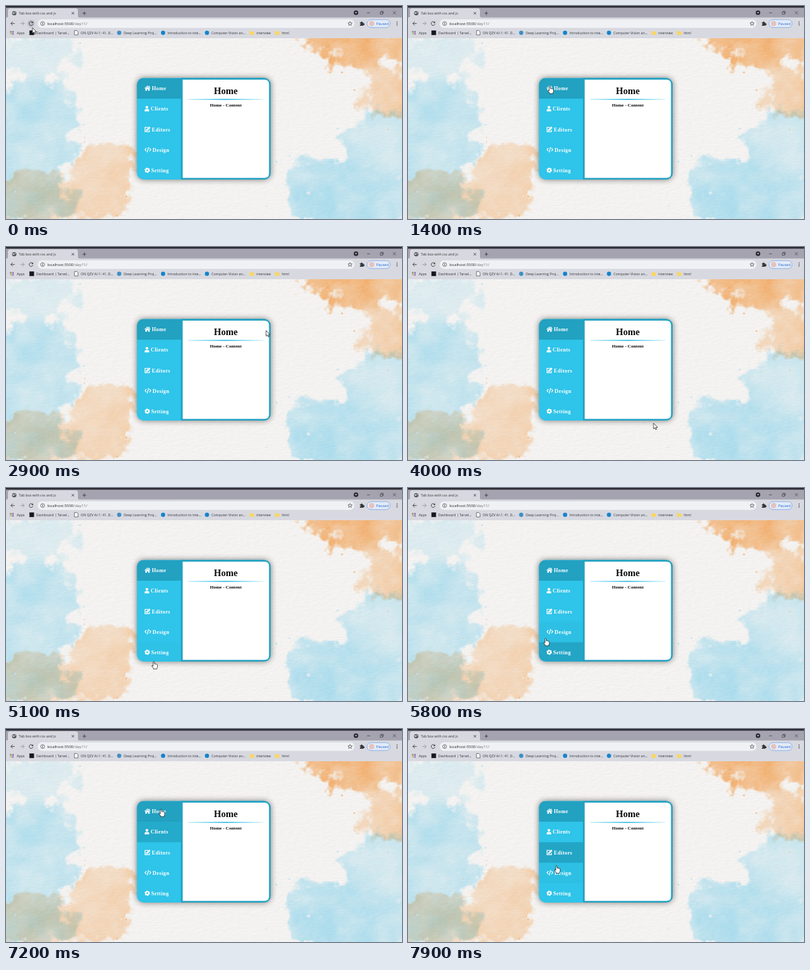
Recreate the animation shown at these times as an HTML page with a canvas. Size 600 px wide and 324 px high, loop 8 s.

```html
<!DOCTYPE html>
<html lang="en">
<head>
<meta charset="utf-8">
<title>Tab box with css and js</title>
<style>
  html, body { margin: 0; width: 100%; height: 100%; overflow: hidden; background: #f2f1ef; }
  canvas, svg { position: absolute; left: 0; top: 0; width: 100%; height: 100%; display: block; }
  .ui { font-family: "Open Sans", "Noto Sans", sans-serif; fill: #33363a; }
  .serif { font-family: "Liberation Serif", "Noto Serif", serif; font-weight: bold; }
  .line { fill: none; stroke: #3c3f43; stroke-width: .9; }
  .thin { stroke-width: .7; }
  .icon { fill: none; stroke: #fff; stroke-width: 1.2; }
</style>
</head>
<body>
<canvas id="paper" width="600" height="324"></canvas>
<svg viewBox="0 0 600 324" preserveAspectRatio="none">
  <defs>
    <filter id="shadow" x="-20%" y="-20%" width="140%" height="140%">
      <feGaussianBlur stdDeviation="4.5"/>
    </filter>
    <clipPath id="cardClip"><rect x="198.5" y="109.5" width="202.5" height="154.5" rx="10"/></clipPath>
    <linearGradient id="rule">
      <stop offset="0" stop-color="#2cc1e8" stop-opacity=".25"/>
      <stop offset=".5" stop-color="#2cb9e0"/>
      <stop offset="1" stop-color="#2cc1e8" stop-opacity=".15"/>
    </linearGradient>
  </defs>

  <!-- browser frame -->
  <g class="ui">
    <rect width="600" height="18" fill="#a5a3b0"/>
    <rect width="600" height="2.5" fill="#2b2b34"/>
    <path d="M0 18Q3 18 3 15V7Q3 3.500 6.500 3.500H105.500Q109 3.500 109 7V15Q109 18 112 18Z" fill="#d8d9e0"/>
    <rect y="17.500" width="600" height="31.500" fill="#d8d9e0"/>
    <circle cx="12.500" cy="11" r="3.300" fill="#55595e"/>
    <path d="M10.300 9.500l2.200 .6 .3 1.500-1.500 .5-1.300-1zM13.200 8.400l1.500 1-.3 1.500-1-.9z" fill="#d8d9e0"/>
    <text x="19.500" y="13" font-size="5.300">Tab box with css and js</text>
    <path class="line" d="M99.600 9.200l3.600 3.600m0-3.600l-3.600 3.600M116 11h5.400M118.700 8.300v5.400"/>
    <circle cx="530.300" cy="10.200" r="3.400" fill="#26262d"/>
    <path d="M528.500 9.300h3.600l-1.800 2.200z" fill="#c9c8d2"/>
    <path class="line thin" d="M547 10.400h4.600M567 9.200h3.400v3.400H567zM568.200 9.200V8h3.400v3.400h-1.200M586.300 8.100l4.400 4.400m0-4.400l-4.400 4.400"/>

    <rect x="48" y="20.200" width="480" height="13" rx="6.500" fill="#f0f1f4"/>
    <path class="line" d="M13.200 26.600H7.400M10.200 23.700l-2.900 2.900 2.900 2.900"/>
    <path class="line" style="stroke:#95989e" d="M21.800 26.600h5.800M24.800 23.700l2.900 2.900-2.900 2.900"/>
    <circle id="reloadHover" cx="38" cy="26.700" r="5.700" fill="#bfc1c8"/>
    <path class="line" d="M40.300 24.800A2.900 2.900 0 1 0 40.900 27.300"/>
    <path d="M41.200 23.200v2.900h-2.900z" fill="#3c3f43"/>
    <circle class="line thin" cx="55.500" cy="26.700" r="2.900"/>
    <path class="line" d="M55.500 26.300v2M55.500 24.700v.8"/>
    <text x="62.500" y="28.900" font-size="5.900" fill="#26282b">localhost:5500<tspan fill="#686c71">/day11/</tspan></text>
    <path class="line thin" d="M521.300 23.500l.9 2.100 2.300 .2-1.700 1.500 .5 2.200-2-1.200-2 1.200 .5-2.200-1.700-1.500 2.300-.2z"/>
    <path d="M536 25h1.700a1.200 1.200 0 1 1 2.300 0h1.600v1.700a1.200 1.200 0 1 1 0 2.200v1H536v-1.500a1.100 1.100 0 1 0 0-2.100z"/>
    <rect x="547" y="20.800" width="35" height="12" rx="6" fill="#e3ebf8" stroke="#7ba6e4" stroke-width=".8"/>
    <circle cx="554" cy="26.800" r="4" fill="#e4c3bd"/>
    <text x="561" y="28.900" font-size="5.500" fill="#1d66cc">Paused</text>
    <path class="line" style="stroke-width:1.500;stroke-linecap:round" stroke-dasharray="0 2.400" d="M592.500 24.300v5"/>
    <g id="marks" font-size="5.200"></g>
  </g>

  <!-- card -->
  <rect x="198" y="109" width="203.500" height="155.500" rx="11" fill="#222" opacity=".55" filter="url(#shadow)"/>
  <g clip-path="url(#cardClip)">
    <rect x="198" y="109" width="204" height="156" fill="#2fc4e9"/>
    <g id="rows" fill="#22a1c1"></g>
    <rect x="265" y="109" width="137" height="156" fill="#22a1c1"/>
  </g>
  <path d="M267.700 112H391.500Q398.500 112 398.500 119V254.500Q398.500 261.500 391.500 261.500H267.700Z" fill="#fff"/>
  <g class="serif" text-anchor="middle" fill="#0b0b0b">
    <text x="333" y="134" font-size="14.100">Home</text>
    <text x="333" y="153.200" font-size="7.050">Home - Content</text>
  </g>
  <rect x="276" y="141.300" width="114" height="1.600" fill="url(#rule)"/>
  <g id="menu" class="serif" fill="#fff" font-size="8" letter-spacing=".4"></g>
</svg>

<svg viewBox="0 0 600 324" preserveAspectRatio="none">
  <g id="cursor" stroke="#111" stroke-width=".7" fill="#fff" stroke-linejoin="round">
    <path id="arrow" d="M0 0V8.600L2 6.800L3.300 9.900L4.700 9.300L3.400 6.300H6.200Z"/>
    <path id="hand" d="M-1 1Q-1 0 0 0T1 1V3.800Q2 3 2.700 4Q3.700 3.400 4.200 4.400Q5.500 4.100 5.500 5.300V7.500Q5.500 9 4.600 10.300V11.300H-.6V10.300L-3 7Q-3.400 5.800-2.200 5.900L-1 7Z"/>
  </g>
</svg>

<script>
const NS = 'http://www.w3.org/2000/svg';
const $ = id => document.getElementById(id);
const clamp = (v, lo = 0, hi = 1) => Math.min(hi, Math.max(lo, v));

function add(parent, tag, attrs, text) {
  const el = document.createElementNS(NS, tag);
  for (const k in attrs) el.setAttribute(k, attrs[k]);
  if (text) el.textContent = text;
  return parent.appendChild(el);
}

// ---- paper with watercolour washes ----
function hash(x, y) {
  let n = Math.imul(x, 374761393) + Math.imul(y, 668265263);
  n = Math.imul(n ^ (n >>> 13), 1274126177);
  return ((n ^ (n >>> 16)) >>> 0) / 4294967296;
}

function noise(x, y) {
  const i = Math.floor(x), j = Math.floor(y);
  const ease = f => f * f * (3 - 2 * f);
  const u = ease(x - i), v = ease(y - j);
  const a = hash(i, j), b = hash(i + 1, j), c = hash(i, j + 1), d = hash(i + 1, j + 1);
  return (a + (b - a) * u) * (1 - v) + (c + (d - c) * u) * v;
}

function fbm(x, y) {
  let sum = 0;
  for (let o = 0, amp = .53; o < 4; o++, amp /= 2, x *= 2.1, y *= 2.1) sum += amp * noise(x + o * 17, y);
  return sum;
}

const wash = (cx, cy, rx, ry, strength) => ({ cx, cy, rx, ry, strength });
const pigments = [
  { ink: [.42, .82, .97], drop: '#c3e3f2', seed: 3, washes: [
    wash(30, 75, 85, 40, .17), wash(35, 190, 78, 95, .36), wash(20, 290, 95, 50, .34),
    wash(570, 215, 65, 60, .26), wash(525, 285, 108, 62, .38)] },
  { ink: [.99, .64, .3], drop: '#f3bf8c', seed: 91, washes: [
    wash(550, 58, 85, 42, .64), wash(580, 125, 48, 48, .4),
    wash(150, 265, 50, 58, .3), wash(45, 290, 105, 48, .3)] }
];

function coverage(p, x, y) {
  let best = -99, strength = 0, weight = 0;
  for (const w of p.washes) {
    const d = (1 - Math.hypot((x - w.cx) / w.rx, (y - w.cy) / w.ry)) * Math.min(w.rx, w.ry);
    best = Math.max(best, d);
    const k = Math.exp(clamp(d, -60, 60) / 8);
    strength += w.strength * k;
    weight += k;
  }
  if (best < -35) return 0;
  const v = best + 62 * (fbm(x / 22 + p.seed, y / 22) - .5);
  const tone = .45 + 1.1 * fbm(x / 32 + p.seed * 2, y / 32 + 9);
  return clamp(v / 9) * tone * strength / weight;
}

function paintPaper() {
  const ctx = $('paper').getContext('2d');
  const img = ctx.createImageData(600, 324);
  for (let y = 48; y < 324; y++) for (let x = 0; x < 600; x++) {
    const grain = 6 * (noise(x / 5, y / 2) - noise(x / 5 + .3, y / 2 + .6));
    const rgb = [243 + grain, 242 + grain, 240 + grain];
    for (const p of pigments) {
      const a = coverage(p, x, y);
      if (a) p.ink.forEach((k, c) => rgb[c] *= 1 - a * (1 - k));
    }
    img.data.set([...rgb, 255], (y * 600 + x) * 4);
  }
  ctx.putImageData(img, 0, 0);
  for (const p of pigments) p.washes.forEach((w, k) => splatter(ctx, w, p.drop, p.seed + k * 5));
}

// small drops thrown just outside a wash
function splatter(ctx, w, colour, seed) {
  ctx.fillStyle = colour;
  for (let i = 0; i < 10; i++) {
    const angle = 6.28 * hash(i, seed), reach = 1 + .35 * hash(i, seed + 1);
    const x = w.cx + w.rx * reach * Math.cos(angle), y = w.cy + w.ry * reach * Math.sin(angle);
    if (y < 52) continue;
    ctx.beginPath();
    ctx.arc(x, y, .3 + 1.3 * hash(i, seed + 2) ** 3, 0, 7);
    ctx.fill();
  }
}

// ---- bookmarks ----
const dot = colour => (g, x) => add(g, 'circle', { cx: x + 3.5, cy: 40.7, r: 3.2, fill: colour });
const square = (g, x) => add(g, 'rect', { x, y: 37.2, width: 7, height: 7, fill: '#15191d' });
const sheet = (g, x) => add(g, 'path', { d: `M${x + .8} 37.300h3.600l1.700 1.700v5h-5.300z`, fill: '#fff', class: 'line thin', style: 'fill:#fff' });
const folder = (g, x) => add(g, 'path', { d: `M${x} 38h2.600l.8 .9h3.600v5h-7z`, fill: '#f7d667' });
function grid(g, x) {
  for (let i = 0; i < 9; i++)
    add(g, 'rect', { x: x + i % 3 * 2, y: 38 + Math.floor(i / 3) * 2, width: 1.5, height: 1.5, fill: `hsl(${i * 130} 65% 52%)` });
}

const marks = [
  [6, grid, 'Apps'], [35.5, square, 'Dashboard | Tarvel...'], [103, sheet, 'ON QZV AI-1: 41. D...'],
  [168, dot('#3f8fc4'), 'Deep Learning Proj...'], [234.5, dot('#1584cc'), 'Introduction to inte...'],
  [301, dot('#1584cc'), 'Computer Vision an...'], [369, folder, 'interview'], [407.5, folder, 'html']
];
for (const [x, icon, label] of marks) {
  icon($('marks'), x);
  add($('marks'), 'text', { x: x + 10.2, y: 42.6 }, label);
}

// ---- side menu ----
const ROW = 31.2, TOP = 109.8, LEFT = 198.5, RIGHT = 265;
const items = [
  ['Home', 221, '<path d="M-.2 4.200L4.400 .2 6.500 2V.7h1.200V3l1.400 1.200-.7 .8-4-3.500-4 3.500zM1.200 5l3.200-2.800L7.600 5v3.300H5.400V5.800h-2v2.500H1.200z"/>'],
  ['Clients', 219.3, '<circle cx="3.500" cy="2.100" r="2.100"/><path d="M0 8.200V7q0-2.300 2.200-2.300h2.600Q7 4.700 7 7v1.200z"/>'],
  ['Editors', 221, '<path class="icon" d="M5 1.300H.7v6.600h6.600V5.200"/><path d="M2.500 4.600L7 .1l1.900 1.900L4.400 6.500l-2.200 .3z"/>'],
  ['Design', 222, '<path class="icon" d="M2.600 1.800L.7 4.200l1.900 2.400M7.400 1.800l1.900 2.400-1.900 2.400M6 .3L4 8.200"/>'],
  ['Setting', 220, '<circle class="icon" cx="4" cy="4.200" r="2.300" style="stroke-width:2"/><circle class="icon" cx="4" cy="4.200" r="3.500" stroke-dasharray="1.830"/>']
];

const fades = items.map(([label, x, icon], i) => {
  const y = TOP + i * ROW;
  add($('menu'), 'g', { transform: `translate(210 ${y + 11})` }).innerHTML = icon;
  add($('menu'), 'text', { x, y: y + 18.3 }, label);
  return add($('rows'), 'rect', { x: 198, y, width: 67, height: ROW, opacity: i ? 0 : 1 });
});

// ---- pointer: each stop is arrival time, position and rest ----
const stop = (at, x, y, rest = 0) => ({ at, x, y, rest });
const stops = [
  stop(0, 40, 33, 300), stop(1100, 324, 130, 100), stop(1400, 215, 122, 100), stop(2200, 296, 115, 100),
  stop(2900, 394, 127), stop(3400, 400, 211, 100), stop(4000, 372, 268), stop(4500, 289, 271, 200),
  stop(5100, 224, 264), stop(5600, 208, 255), stop(6300, 210, 163), stop(7100, 234, 145),
  stop(7200, 235, 122), stop(7500, 231, 176), stop(7900, 225, 208)
];

function pointer(t) {
  const i = stops.findLastIndex(s => s.at <= t);
  const a = stops[i], b = stops[i + 1] || a;
  const leave = a.at + a.rest;
  const f = b === a ? 0 : clamp((t - leave) / (b.at - leave));
  return [a.x + (b.x - a.x) * f, a.y + (b.y - a.y) * f];
}

function rowAt([x, y]) {
  if (x < LEFT || x > RIGHT || y < TOP || y > 264.5) return -1;
  return Math.min(4, Math.floor((y - TOP) / ROW));
}

// replays the last second of hovering through a linear fade
function hoverLevels(t) {
  const FADE = 300, STEP = 20, levels = items.map(() => 0);
  for (let s = Math.max(0, t - 1000); s < t; s += STEP) {
    const over = rowAt(pointer(s));
    levels.forEach((v, i) => levels[i] = clamp(v + (i === over ? STEP : -STEP) / FADE));
  }
  return levels;
}

function render(time) {
  const t = Math.floor(time % 8000 / 100) * 100;
  const pos = pointer(t), over = rowAt(pos) >= 0;
  $('cursor').setAttribute('transform', `translate(${pos})`);
  $('hand').setAttribute('display', over ? 'inline' : 'none');
  $('arrow').setAttribute('display', over ? 'none' : 'inline');
  $('reloadHover').setAttribute('opacity', t < 400 ? 1 : 0);
  hoverLevels(t).forEach((v, i) => { if (i) fades[i].setAttribute('opacity', v); });
}

paintPaper();
const start = performance.now();
(function tick() {
  render(performance.now() - start);
  requestAnimationFrame(tick);
})();
</script>
</body>
</html>
```
